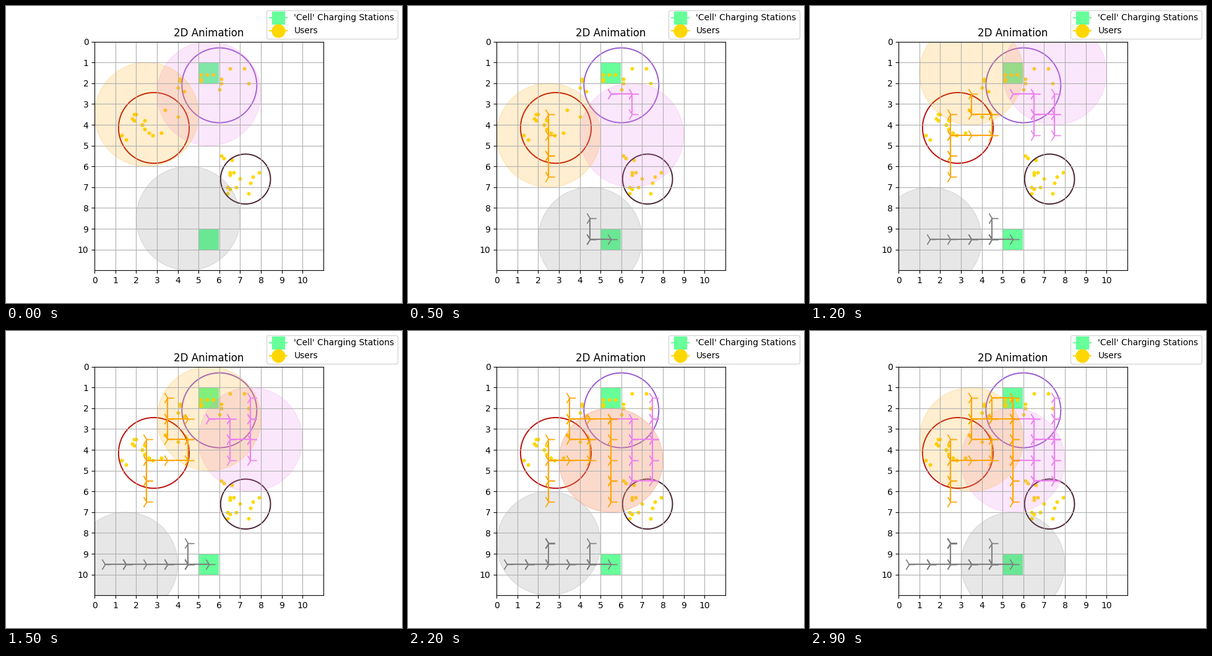
These frames come from a looping animation (640x480 px, 3 s). A matplotlib script:

```python
import numpy as np
import matplotlib.pyplot as plt
from matplotlib.animation import FuncAnimation
from matplotlib.lines import Line2D
from matplotlib.patches import Circle, Rectangle

FRAMES, INTERVAL = 30, 100
SIZE = 11
GREEN, GOLD = "#66ff99", "gold"
USERS_PER_GROUP = 15

STEPS = {"U": (0, -1), "D": (0, 1), "L": (-1, 0), "R": (1, 0), "S": (0, 0)}

# colour, starting cell centre, one move per frame (S = stay)
AGENTS = [
    ("gray", (4.5, 8.5), "DSSRLSLSSLLSSLRRU" + "S" * 8 + "DRRR"),
    ("violet", (5.5, 2.5), "RLRDDUSRDUUUDSDDDLRLUL" + "S" * 7),
    ("orange", (2.5, 3.5), "DDDUURRUSLUUDRRSDDDDUUUUULDLD"),
]

STATIONS = [(5, 1), (5, 9)]

# ring centre, ring radius, ring colour, mean and spread of the users
GROUPS = [
    ((6.0, 2.1), 1.8, (0.60, 0.35, 0.82), (5.75, 1.85), (1.0, 0.3)),
    ((2.85, 4.15), 1.7, (0.74, 0.05, 0.03), (2.6, 3.9), (0.85, 0.6)),
    ((7.26, 6.61), 1.2, (0.29, 0.13, 0.20), (7.0, 6.4), (0.55, 0.55)),
]


def walk(start, moves):
    """Positions for every frame, the start included."""
    return np.cumsum([start] + [STEPS[m] for m in moves], axis=0)


def scatter_users(rng, mean, spread):
    """Users around a mean, on a grid of tenths."""
    offsets = rng.normal(size=(USERS_PER_GROUP, 2)).clip(-1.7, 1.7)
    return np.round(mean + offsets * spread, 1)


def legend_handle(marker, color, label):
    return Line2D([], [], marker=marker, color=color, markersize=15, label=label)


fig, ax = plt.subplots(figsize=(6.4, 4.8), dpi=100)
ax.set_aspect("equal")
ax.set_xlim(0, SIZE)
ax.set_ylim(SIZE, 0)
ax.set_xticks(range(SIZE))
ax.set_yticks(range(SIZE))
ax.grid(True)
ax.set_title("2D Animation")

for corner in STATIONS:
    ax.add_patch(Rectangle(corner, 0.97, 1, facecolor=GREEN, edgecolor="none"))

rng = np.random.default_rng(4)
for center, radius, color, mean, spread in GROUPS:
    users = scatter_users(rng, mean, spread)
    ax.plot(*users.T, ".", color=GOLD, markersize=6.5, zorder=1)
    ax.add_patch(Circle(center, radius, fill=False, edgecolor=color, linewidth=1.4))

paths, discs, trails = [], [], []
for color, start, moves in AGENTS:
    paths.append(walk(start, moves))
    discs.append(ax.add_patch(Circle(start, 2.5, color=color, alpha=0.19)))
    trails.append(ax.plot([], [], marker="4", markersize=15, color=color)[0])

fig.legend(handles=[
    legend_handle("s", GREEN, "'Cell' Charging Stations"),
    legend_handle("o", GOLD, "Users"),
])


def update(frame):
    for path, disc, trail in zip(paths, discs, trails):
        disc.center = tuple(path[frame])
        # the trail lags one step; each point is stamped twice for weight
        visited = np.repeat(path[:frame], 2, axis=0)
        trail.set_data(visited[:, 0], visited[:, 1])
    return discs + trails


anim = FuncAnimation(fig, update, frames=FRAMES, interval=INTERVAL,
                     init_func=lambda: update(0), repeat=True, repeat_delay=0)
plt.show()
```
